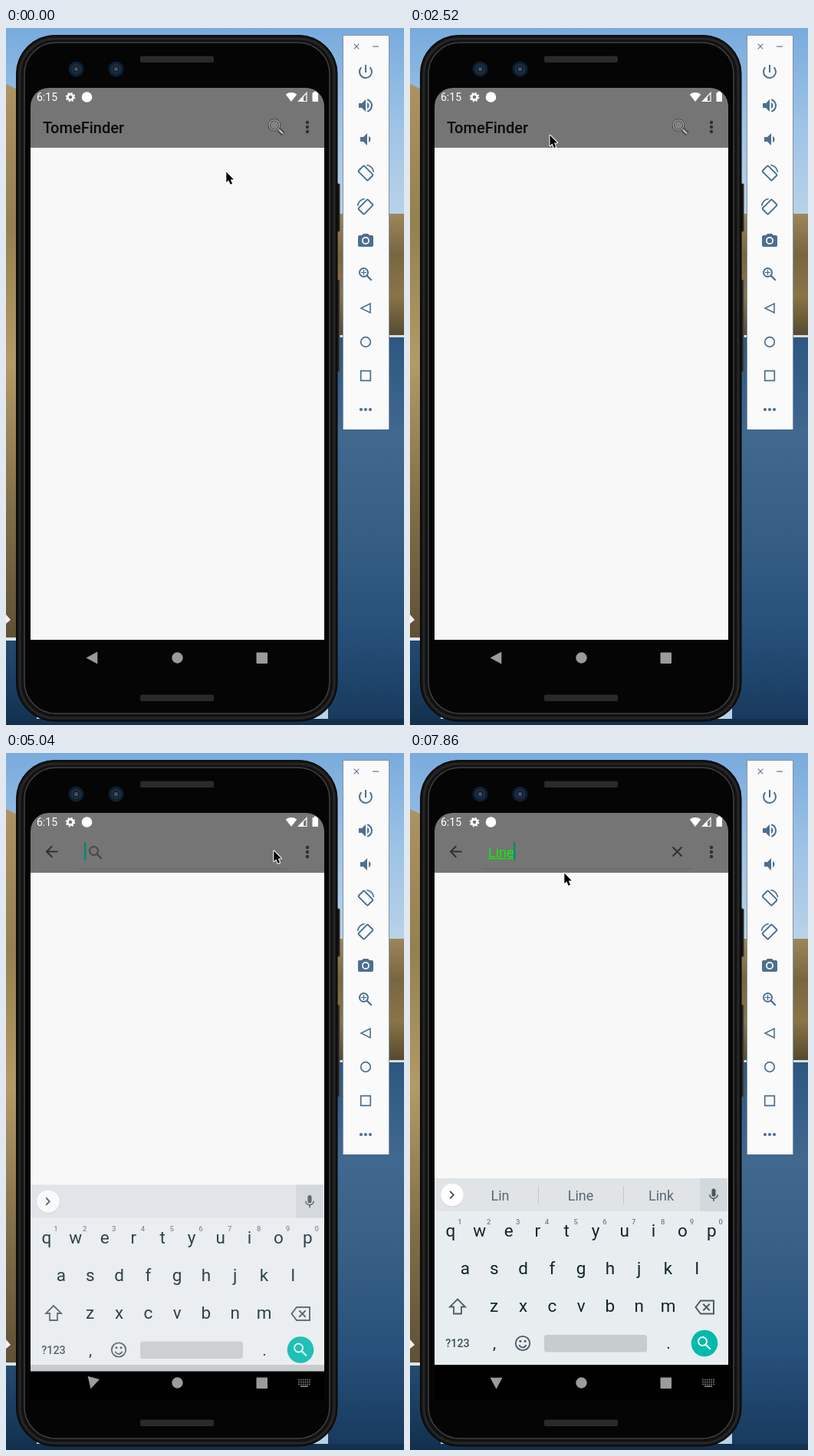
Animation of 519x908 px, one loop 8 s. Source, as an HTML page with a canvas:

```html
<!DOCTYPE html>
<html lang="en">
<head>
<meta charset="utf-8">
<title>Phone search</title>
<style>
html, body { margin: 0; width: 100%; height: 100%; overflow: hidden; background: #123; }
canvas { display: block; }
</style>
</head>
<body>
<canvas id="stage" width="519" height="908"></canvas>
<script>
const c = document.getElementById('stage').getContext('2d');
const LOOP = 8000, TICK = 148;
const TAU = Math.PI * 2;

// Drawing helpers
function rect(x, y, w, h, color) {
  c.fillStyle = color;
  c.fillRect(x, y, w, h);
}
function round(x, y, w, h, r, fill, stroke, lw = 1) {
  c.beginPath();
  c.roundRect(x, y, w, h, r);
  if (fill) { c.fillStyle = fill; c.fill(); }
  if (stroke) { c.strokeStyle = stroke; c.lineWidth = lw; c.stroke(); }
}
function disc(x, y, r, color, from = 0, to = TAU) {
  c.beginPath();
  c.arc(x, y, r, from, to);
  c.fillStyle = color;
  c.fill();
}
function ring(x, y, r, color, lw, from = 0, to = TAU) {
  c.beginPath();
  c.arc(x, y, r, from, to);
  c.strokeStyle = color;
  c.lineWidth = lw;
  c.stroke();
}
function dots(n, x, y, dx, dy, r, color) {
  for (let i = 0; i < n; i++) disc(x + i * dx, y + i * dy, r, color);
}
function trace(points, closed) {
  c.beginPath();
  points.forEach(([x, y]) => c.lineTo(x, y));
  if (closed) c.closePath();
}
function poly(points, color) {
  trace(points, true);
  c.fillStyle = color;
  c.fill();
}
function line(points, color, lw, closed) {
  trace(points, closed);
  c.strokeStyle = color;
  c.lineWidth = lw;
  c.stroke();
}
function text(str, x, y, size, color, align = 'center', weight = 400) {
  c.font = `${weight} ${size}px Roboto, sans-serif`;
  c.textAlign = align;
  c.fillStyle = color;
  c.fillText(str, x, y);
}
function shade(y0, y1, ...colors) {
  const g = c.createLinearGradient(0, y0, 0, y1);
  colors.forEach((color, i) => g.addColorStop(i / (colors.length - 1), color));
  return g;
}
function at(x, y, paint, ...args) {
  c.save();
  c.translate(x, y);
  paint(...args);
  c.restore();
}

// Icons, drawn around the origin
function lens(color) {
  ring(-2.5, -2.5, 5.5, color, 2);
  line([[1.6, 1.6], [7.8, 7.8]], color, 2.2);
}
function zoom(color) {
  lens(color);
  cross(color, 2.5, 1.2, -2.5, true);
}
function cross(color, r, lw, center = 0, upright = false) {
  c.save();
  c.translate(center, center);
  if (upright) c.rotate(Math.PI / 4);
  line([[-r, -r], [r, r]], color, lw);
  line([[-r, r], [r, -r]], color, lw);
  c.restore();
}
function power(color) {
  ring(0, 0, 8, color, 2, -0.8, Math.PI + 0.8);
  line([[0, -9], [0, 1]], color, 2);
}
function speaker(color, loud) {
  if (!loud) c.translate(2, 0);
  poly([[-9, -3], [-5, -3], [0, -8], [0, 8], [-5, 3], [-9, 3]], color);
  disc(0, 0, 4.5, color, -1.1, 1.1);
  if (loud) ring(0, 0, 8, color, 2, -1.3, 1.3);
}
function rotation(color, side) {
  c.scale(side, 1);
  ring(0, 0, 10.6, color, 1.6, -1.45, -0.1);
  c.rotate(Math.PI / 4);
  round(-8.7, -5.3, 17.4, 10.6, 1.5, null, color, 2);
}
function camera(color) {
  round(-10, -7, 20, 15, 2, color);
  poly([[-6, -6], [-3, -9], [3, -9], [6, -6]], color);
  ring(0, 0, 4.1, '#fafafa', 1.8);
}
function triangle(color) {
  line([[6, -6], [6, 6], [-6, 0]], color, 1.6, true);
}
function mic(color) {
  c.scale(0.85, 0.85);
  round(-3, -10, 6, 12, 3, color);
  ring(0, -1, 6.1, color, 1.8, 0, Math.PI);
  line([[0, 5], [0, 9]], color, 2);
}
function backArrow(color) {
  line([[-7, 0], [8, 0]], color, 2);
  line([[0.7, -7.2], [-6.5, 0], [0.7, 7.2]], color, 2);
}
function backspace(color) {
  line([[-5, -8.5], [12, -8.5], [12, 8.5], [-5, 8.5], [-11.5, 0]], color, 2, true);
  at(2.5, 0, cross, color, 4.2, 2);
}
function shift(color) {
  line([[0, -10], [10, 0], [5, 0], [5, 9], [-5, 9], [-5, 0], [-10, 0]], color, 1.8, true);
}
function smile(color, r) {
  dots(2, -r / 3, -r / 3.3, r / 1.5, 0, r / 6, color);
  ring(0, 0.5, r / 1.9, color, 1.7, 0.35, Math.PI - 0.35);
}
function gear(color) {
  ring(0, 0, 3.6, color, 2.6);
  c.setLineDash([TAU * 5.4 / 16]);
  ring(0, 0, 5.4, color, 1.8);
}
function pointer() {
  c.lineJoin = 'round';
  const arrow = [[0.3, 0.5], [0.3, 14], [3.3, 11.2], [5.6, 16.8], [8, 15.8], [5.8, 10.4], [9.8, 10.2]];
  line(arrow, '#fff', 2, true);
  poly(arrow, '#000');
}

function drawBackdrop() {
  rect(0, 0, 519, 908, shade(0, 240, '#78abdd', '#9cc2e5', '#b8d2e8'));
  rect(420, 242, 99, 160, shade(242, 402, '#9c875a', '#796541', '#8a7548', '#54482f'));
  rect(420, 402, 99, 506, shade(402, 908, '#2c5780', '#41688f', '#375f85', '#27507a', '#17395c'));
  rect(420, 400, 99, 3, '#d5dee4');
  poly([[0, 73], [40, 92], [40, 797], [0, 797]], shade(75, 797, '#ad9262', '#94804f', '#b39a66', '#836f48', '#5f5035'));
  rect(0, 797, 40, 111, shade(797, 908, '#244b70', '#12304f'));
  rect(0, 900, 519, 8, '#14304f');
  rect(0, 794, 14, 4, '#dfe5e6');
  poly([[0, 764], [6, 771], [0, 776]], '#f0f1ee');
}

function drawPhone() {
  round(430, 203, 5, 62, 1, '#161616', '#333');
  round(430, 328, 5, 120, 1, '#242424', '#555');
  round(13.5, 9.5, 418.5, 893.5, 50, '#121212', '#050505');
  round(18, 14, 410, 885, 46, null, '#262626', 3);
  round(24, 19, 398, 874, 41, '#050505', '#3f4043', 1.5);
  for (const y of [36.5, 868.5]) round(175, y, 96, 8.5, 2, '#2a2a2a');
  for (const x of [91.5, 143.5]) {
    disc(x, 53.5, 10, '#0d2035');
    ring(x, 53.5, 5.5, '#1d3247', 2);
    disc(x, 53.5, 2.6, '#594b45');
  }
}

function drawPanel() {
  const ink = '#4d6f8f';
  rect(439, 9, 61, 514, '#8493a0');
  rect(440, 10, 59, 513, '#fafafa');
  at(457, 24, cross, '#607d94', 3.3, 1.2);
  rect(478, 23.5, 8, 1.2, '#607d94');
  [
    [power], [speaker, true], [speaker, false], [rotation, 1], [rotation, -1], [camera],
    [zoom], [triangle],
    [() => ring(0, 0, 6.3, ink, 1.7)],
    [() => round(-6.3, -6.3, 12.6, 12.6, 0, null, ink, 1.7)],
    [() => dots(3, -6, 0, 6, 0, 2.1, ink)]
  ].forEach(([paint, option], i) => at(469, 57 + i * 44, paint, ink, option));
}

function drawStatusBar() {
  const white = '#fff';
  round(32, 78, 383, 78, [24, 24, 0, 0], '#757575');
  text('6:15', 40, 95, 14, white, 'left');
  at(84, 90, gear, white);
  disc(105.5, 90, 6.8, white);
  c.beginPath();
  c.moveTo(372, 96);
  c.arc(372, 96, 12, -Math.PI / 2 - 0.65, -Math.PI / 2 + 0.65);
  c.fill();
  line([[381.5, 95.5], [392, 95.5], [392, 84.5]], white, 1.2, true);
  poly([[381, 96], [388, 96], [388, 88.5]], white);
  round(399.5, 84, 7.5, 12, 1, white);
  rect(401.5, 82.6, 3.5, 2, white);
}

function drawMagnifier() {
  line([[356, 132.5], [361.5, 138]], '#353535', 5.5);
  line([[356, 132.5], [361.2, 137.7]], '#bbb', 2.6);
  ['#3d3d3d', '#bdbdbd', '#484848', '#828282'].forEach((color, i) => disc(350, 126.5, 8.3 - i, color));
}

function drawHeader(searching, typed, caretOn) {
  const ink = '#303030', green = '#00f500';
  dots(3, 393, 123, 0, 6, 2.2, ink);
  if (!searching) {
    text('TomeFinder', 48, 136.5, 20, '#0b0b0b', 'left', 500);
    drawMagnifier();
    return;
  }
  at(59.5, 128.5, backArrow, ink);
  rect(94, 150.5, 274, 1, '#686868');
  let caretX = 102;
  if (typed) {
    text(typed, 102, 135.5, 18, green, 'left');
    const width = c.measureText(typed).width;
    rect(102, 137, width, 1.2, green);
    caretX += width - 0.5;
    at(348.5, 128.5, cross, ink, 6, 1.9);
  } else {
    at(117, 130, lens, '#484848');
  }
  if (caretOn) rect(caretX, 116, 2.3, 24, '#00897c');
}

function drawNav(turn, keysShown) {
  const gray = '#9b9b9b';
  rect(32, 797, 383, 46, keysShown ? '#000' : '#050505');
  at(112.5, 820.5, () => {
    c.rotate(-turn);
    poly([[-8, 0], [6.8, -8], [6.8, 8]], gray);
  });
  disc(223.5, 820.5, 7.2, gray);
  round(326.5, 813.5, 14.5, 14.5, 1, gray);
  if (!keysShown) return;
  for (let row = 0; row < 3; row++) dots(6, 382, 816.5 + row * 3, 2.8, 0, 0.9, '#858585');
  rect(384, 824.3, 10, 1.6, '#858585');
}

function drawTools() {
  const ink = '#59666e';
  at(106, 576, lens, ink);
  round(153.5, 568.5, 15, 15, 2.5, null, ink, 1.8);
  at(161, 575.5, smile, ink, 8);
  c.letterSpacing = '1px';
  text('GIF', 216.5, 580.5, 13.5, ink, 'center', 700);
  c.letterSpacing = '0px';
  rect(265, 568, 16, 16, ink);
  rect(306.5, 565, 1, 22, '#c7cdd1');
  dots(3, 335.5, 576, 6, 0, 1.9, ink);
}

function drawWords(words) {
  words.forEach((word, i) => {
    text(word, 117.5 + i * 105, 583, 18, '#59676f');
    if (i) rect(56 + i * 111, 564, 1, 23, '#c3c9cd');
  });
}

function drawKeyboard(tools, words) {
  const ink = '#10262e', soft = '#4b5c65';
  rect(32, 554, 383, 243, '#e8edf0');
  rect(32, 554, 383, 43, '#e0e4e7');
  rect(378, 554, 35.5, 43, '#d3d8dc');
  at(396, 576, mic, '#4a5960');
  disc(55, 576.7, 15, '#d2d7da');
  disc(55, 575.7, 14.7, '#fff');
  const tip = tools ? -2.3 : 2.3;
  line([[54.5 - tip, 571], [54.5 + tip, 575.7], [54.5 - tip, 580.4]], '#444f55', 1.8);
  if (tools) drawTools();
  drawWords(words);

  ['qwertyuiop', 'asdfghjkl', 'zxcvbnm'].forEach((keys, row) => {
    [...keys].forEach((key, i) => {
      const x = 53 + row * 18.9 + (row > 1 ? 18.9 : 0) + i * 37.8;
      text(key, x, 630 + row * 49, 22.5, ink);
      if (row === 0) text((i + 1) % 10, x + 12, 614, 9.5, '#74818a', 'center', 500);
    });
  });
  at(62, 721.5, shift, soft);
  at(384, 722, backspace, soft);
  text('?123', 62, 774, 14.3, '#3c4f58', 'center', 500);
  text(',', 110, 776, 21, ink);
  text('.', 337, 776, 21, ink);
  ring(147, 769, 9.2, soft, 1.8);
  at(147, 769, smile, soft, 9.2);
  round(175, 758, 134, 22.5, 3, '#c8cccf');
  disc(384, 769, 17.3, '#00baab');
  at(384, 769, lens, '#fff');
}

// Pointer moves: start tick, end tick, destination
const MOVES = [
  [0, 5, 344, 130], [6, 11, 180, 170], [11, 12, 180, 142], [12, 15, 141, 143],
  [15, 22, 349, 124], [22, 24, 362, 127], [24, 26, 349, 127], [34, 38, 201, 156]
];
function pointerAt(tick) {
  return MOVES.reduce(([x, y], [from, to, toX, toY]) => {
    const k = Math.min(1, Math.max(0, (tick - from) / (to - from)));
    const eased = k * k * (3 - 2 * k);
    return [x + (toX - x) * eased, y + (toY - y) * eased];
  }, [287, 187]);
}

function lettersTyped(tick) {
  return tick < 49 ? 0 : Math.min(4, Math.max(1, tick - 49));
}
function suggestions(count) {
  if (!count) return [];
  return count < 3 ? ['Like', 'Life', 'Live'] : ['Lin', 'Line', 'Link'];
}

function draw(ms) {
  const tick = Math.floor(ms / TICK + 0.08);
  const searching = tick >= 33, keysShown = tick >= 34, settling = tick === 34;
  const count = lettersTyped(tick);
  const blinkOn = Math.floor((tick * TICK - 4880) / 500) % 2 === 0;

  drawBackdrop();
  drawPhone();
  drawPanel();
  drawStatusBar();
  rect(32, 156, 383, 641, '#f8f8f8');
  drawHeader(searching, 'Line'.slice(0, count), count > 0 || blinkOn);
  drawNav(settling ? 1.3 : keysShown ? Math.PI / 2 : 0, keysShown);
  if (keysShown) {
    c.globalAlpha = settling ? 0.86 : 1;
    at(0, settling ? 8.5 : 0, drawKeyboard, tick >= 36 && !count, suggestions(count));
    c.globalAlpha = 1;
  }
  at(...pointerAt(tick), pointer);
}

function loop() {
  draw(performance.now() % LOOP);
  requestAnimationFrame(loop);
}
loop();
</script>
</body>
</html>
```
